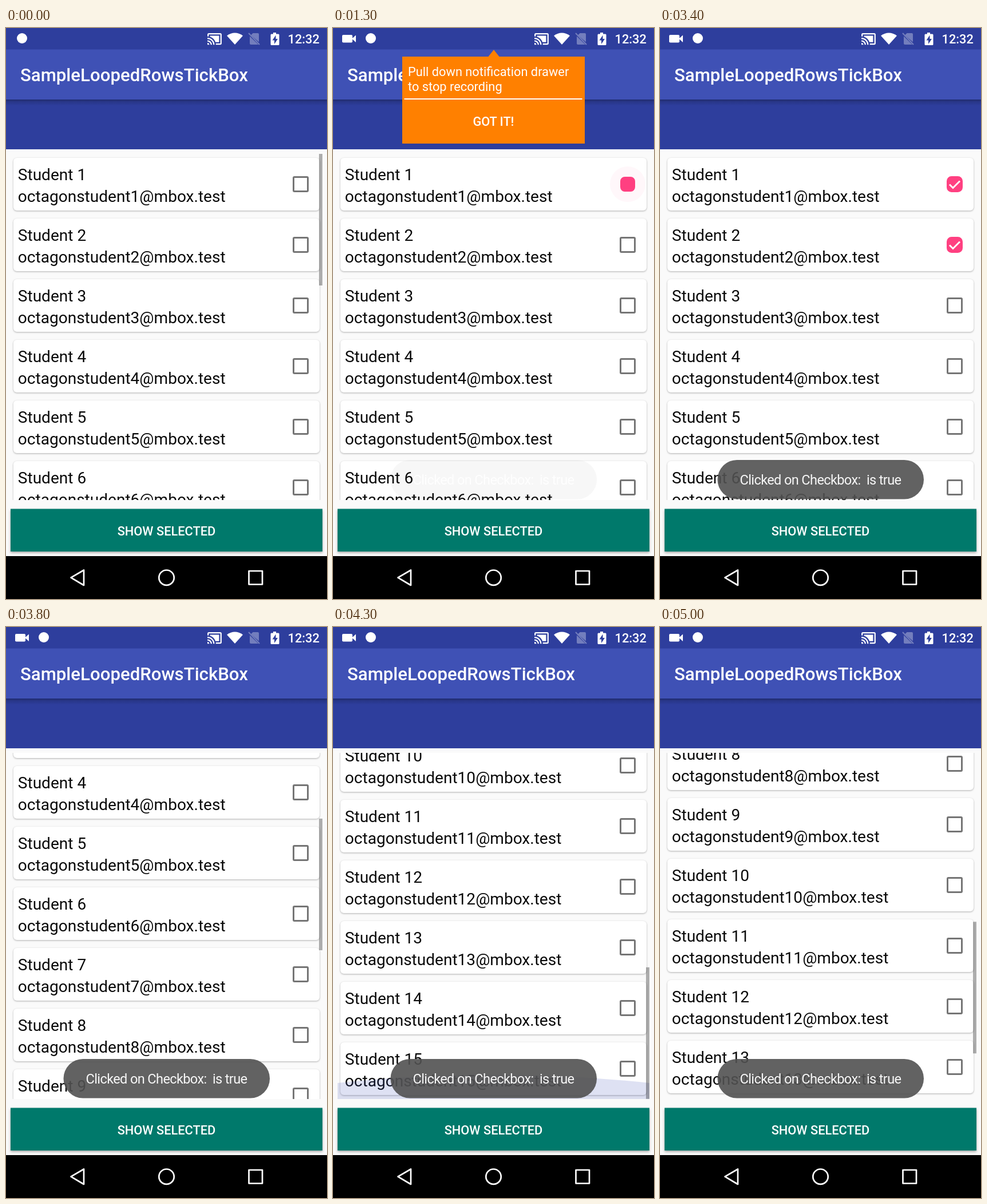
Recreate the animation shown at these times as an HTML page. Size 561x998 px, loop 5100 ms.

```html
<!DOCTYPE html>
<html lang="en">
<head>
<meta charset="utf-8">
<title>Student list</title>
<style>
  html, body { margin: 0; width: 100%; height: 100%; overflow: hidden; background: #fafafa; }
  svg { display: block; width: 100vw; height: 100vh; }
  text { font-family: Roboto, "Noto Sans", sans-serif; white-space: pre; }
  .title { font-size: 31.17px; font-weight: 500; fill: #fff; }
  .label { font-size: 21.8px; font-weight: 500; fill: #fff; }
  .hint { font-size: 21.8px; fill: #fff; }
  .line { font-size: 28.05px; fill: #0a0a0a; }
  .note { font-size: 23.6px; letter-spacing: -.65px; fill: #f6f6f6; }
  .mid { text-anchor: middle; }
  .card { fill: #fff; filter: drop-shadow(0 1.5px 1.5px rgba(0, 0, 0, .3)); }
  .button { fill: #00796b; filter: drop-shadow(0 2px 2px rgba(0, 0, 0, .35)); }
  .tick { fill: none; stroke: #fff; stroke-width: 3; stroke-dasharray: 1 2; }
  .nav { fill: none; stroke: #fff; stroke-width: 2.7; stroke-linejoin: round; }
</style>
</head>
<body>
<svg viewBox="0 0 561 998" preserveAspectRatio="none">
  <defs>
    <clipPath id="view"><rect x="8" y="220" width="545" height="605"/></clipPath>
    <linearGradient id="shade" x2="0" y2="1">
      <stop stop-color="#000" stop-opacity=".3"/>
      <stop offset=".4" stop-color="#000" stop-opacity=".12"/>
      <stop offset="1" stop-color="#000" stop-opacity="0"/>
    </linearGradient>
  </defs>

  <rect width="561" height="998" fill="#fafafa"/>
  <rect width="561" height="212" fill="#2e3e9d"/>
  <rect y="37.5" width="561" height="87.5" fill="#3f51b5"/>
  <rect y="125" width="561" height="11" fill="url(#shade)"/>
  <text class="title" x="25" y="93">SampleLoopedRowsTickBox</text>

  <!-- status bar -->
  <g fill="#fff">
    <g id="camera">
      <rect x="16" y="12" width="18" height="13.5" rx="2"/>
      <path d="M33 18.7L40 12.5V25z"/>
    </g>
    <circle id="badge" cy="18" r="9"/>
    <path transform="translate(350.9 5.6) scale(1.13)" d="M21 3H3c-1.1 0-2 .9-2 2v3h2V5h18v14h-7v2h7c1.1 0 2-.9 2-2V5c0-1.1-.9-2-2-2zM1 18v3h3c0-1.7-1.3-3-3-3zm0-4v2c2.8 0 5 2.2 5 5h2c0-3.9-3.1-7-7-7zm0-4v2c5 0 9 4 9 9h2c0-6.1-4.9-11-11-11zM19 7H5v1.6c4 1.3 7.1 4.4 8.4 8.4H19z"/>
    <path d="M386 13.5Q400 3.5 414 13.5L400 29z"/>
    <g opacity=".33">
      <path d="M431.5 9H440q2 0 2 2V24.5L428 12.500zM426 14.500L441 29H428q-2 0-2-2z"/>
      <path d="M424 9L443 29" stroke="#fff" stroke-width="2"/>
    </g>
    <path d="M467 8h5v2.500h4q1.500 0 1.500 1.500V28.500q0 1.500-1.500 1.500H464q-1.500 0-1.500-1.500V12q0-1.500 1.500-1.500h3z"/>
    <path d="M471.500 12.500L465.500 21.500H469V28L475 19H471.500z" fill="#2e3e9d"/>
    <text class="label" x="492.500" y="27">12:32</text>
  </g>

  <!-- list -->
  <g clip-path="url(#view)">
    <g id="rows"></g>
    <path id="glow" fill="#3f51b5"/>
    <rect id="bar" x="547" width="6" height="230" fill="#000" fill-opacity=".31"/>
  </g>

  <rect class="button" x="8" y="840.5" width="545" height="74.5"/>
  <text class="label mid" x="280.500" y="886.500">SHOW SELECTED</text>

  <rect y="923" width="561" height="75" fill="#000"/>
  <g class="nav">
    <path d="M113.500 960.700L136 947.500V974z"/>
    <circle cx="280.500" cy="960.700" r="13.200"/>
    <rect x="424.500" y="949" width="23.500" height="23.500"/>
  </g>

  <g id="toast">
    <rect x="100.500" y="755" width="360.500" height="68.500" rx="34" fill="#525252" fill-opacity=".9"/>
    <text class="note mid" x="280.500" y="798">Clicked on Checkbox:  is true</text>
  </g>

  <g id="popup">
    <path d="M121 50H271.500L281 38L290.500 50H440V202H121z" fill="#ff8000"/>
    <text class="hint" x="131" y="84">Pull down notification drawer</text>
    <text class="hint" x="131" y="110">to stop recording</text>
    <rect x="124.500" y="123" width="311" height="2" fill="#fff"/>
    <text class="label mid" x="280.500" y="170.700">GOT IT!</text>
  </g>
</svg>

<script>
const LOOP = 5100, STEP = 100;
const TOP = 220, VIEW = 605, ROW = 106, COUNT = 15;
const clicks = [1100, 2800];
const $ = id => document.getElementById(id);
const set = (el, attrs) => { for (const k in attrs) el.setAttribute(k, attrs[k]); };

// Linear interpolation through [time, value] pairs
function track(t, points) {
  if (t <= points[0][0]) return points[0][1];
  for (let i = 1; i < points.length; i++) {
    const [a, from] = points[i - 1], [b, to] = points[i];
    if (t <= b) return from + (to - from) * (t - a) / (b - a);
  }
  return points[points.length - 1][1];
}

const row = n => `<g transform="translate(0 ${TOP + (n - 1) * ROW})">
  <rect class="card" x="13" y="7" width="535" height="92" rx="6"/>
  <text class="line" x="20.8" y="45.5">Student ${n}</text>
  <text class="line" x="20.8" y="83.5">octagonstudent${n}@mbox.test</text>
  <g transform="translate(515 53)">
    <circle class="ripple" fill="#ff4081" opacity="0"/>
    <rect class="box" fill="none" rx="1.5"/>
    <path class="tick" pathLength="1" d="M-9 .5L-3 6.5L9 -5.5" visibility="hidden"/>
  </g>
</g>`;

$("rows").innerHTML = Array.from({ length: COUNT }, (_, i) => row(i + 1)).join("");
const items = [...$("rows").children].map(g => ({
  ripple: g.querySelector(".ripple"),
  box: g.querySelector(".box"),
  tick: g.querySelector(".tick")
}));

// age: time since the tap, negative before it
function drawCheck({ ripple, box, tick }, age) {
  const half = track(age, [[0, 14], [200, 13], [400, 14]]);
  const weight = track(age, [[0, 3], [200, half]]);
  const size = 2 * half - weight;
  set(box, {
    x: -size / 2, y: -size / 2, width: size, height: size,
    "stroke-width": weight, stroke: age >= 100 ? "#ff4081" : "#757575"
  });
  set(tick, {
    visibility: age > 200 ? "visible" : "hidden",
    "stroke-dashoffset": track(age, [[200, 1], [600, 0]])
  });
  set(ripple, {
    r: track(age, [[0, 20], [200, 31]]),
    opacity: age < 0 ? 0 : track(age, [[0, .08], [200, .04], [400, 0]])
  });
}

function draw(t) {
  const recording = t >= 100;
  set($("camera"), { visibility: recording ? "visible" : "hidden" });
  set($("badge"), { cx: recording ? 66 : 28 });
  set($("popup"), { opacity: recording ? track(t, [[1600, 1], [2000, 0]]) : 0 });
  set($("toast"), { opacity: track(t, [[1200, 0], [1300, .05], [1700, 1]]) });

  items.forEach((item, i) => drawCheck(item, i in clicks ? t - clicks[i] : -1));

  const scroll = track(t, [[3600, 0], [3700, 90], [3800, 302], [4000, 700],
    [4200, 985], [4700, 985], [4800, 940], [5000, 776]]);
  set($("rows"), { transform: `translate(0 ${-scroll})` });
  set($("bar"), {
    y: TOP + scroll * VIEW / (ROW * COUNT),
    opacity: t < 3700 ? track(t, [[500, 1], [900, 0]]) : 1
  });

  const pull = track(t, [[4100, 0], [4200, .5], [4300, 1], [4800, 0]]);
  const edge = 825 - 28 * pull;
  set($("glow"), {
    d: `M8 ${edge}Q280.5 ${edge - 29 * pull} 553 ${edge}V825H8z`,
    opacity: .17 * pull
  });
}

function tick() {
  const t = performance.now() % LOOP;
  draw(Math.floor(t / STEP) * STEP);
  requestAnimationFrame(tick);
}
tick();
</script>
</body>
</html>
```
